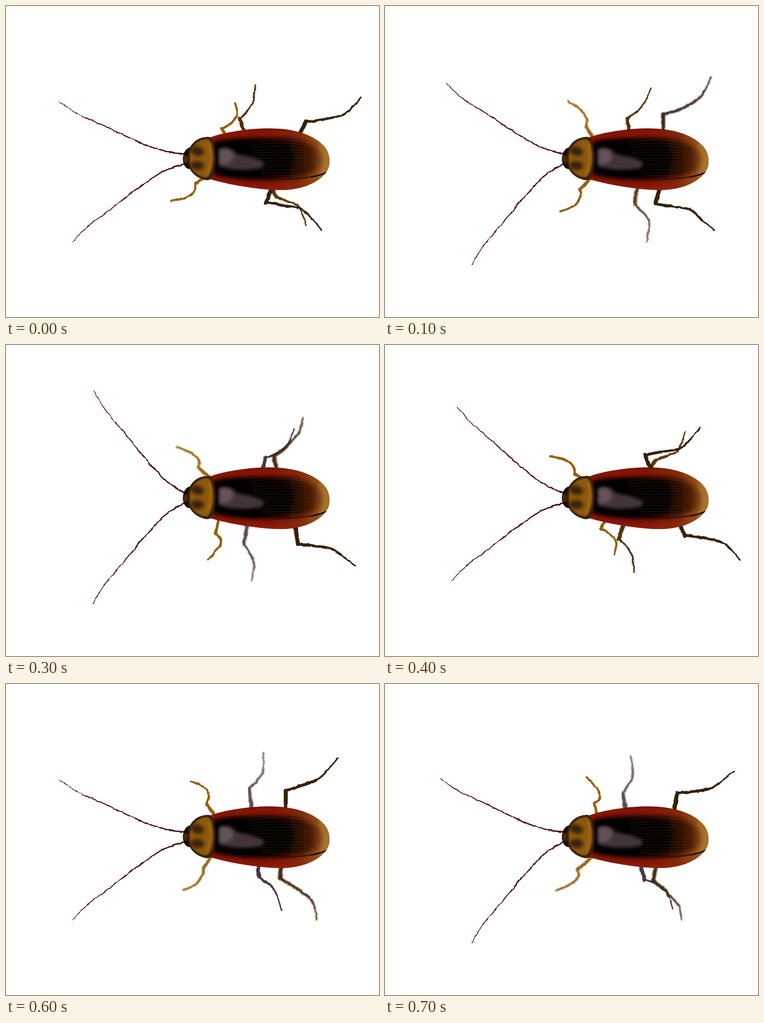
Write an HTML page that moves like this. It is 700x583 px and loops after 800 ms.

```html
<!DOCTYPE html>
<html lang="en">
<head>
<meta charset="utf-8">
<title>Crawling cockroach</title>
<style>
  html, body { margin: 0; width: 100%; height: 100%; overflow: hidden; background: #fff; }
  svg { display: block; width: 100%; height: 100%; }
</style>
</head>
<body>
<svg viewBox="0 0 700 583">
  <defs>
    <linearGradient id="shell" gradientUnits="userSpaceOnUse" x1="385" y1="0" x2="607" y2="0">
      <stop offset="0" stop-color="#8a1507"/>
      <stop offset=".5" stop-color="#861406"/>
      <stop offset=".75" stop-color="#842a0a"/>
      <stop offset=".9" stop-color="#915018"/>
      <stop offset="1" stop-color="#a8752c"/>
    </linearGradient>
    <linearGradient id="core" gradientUnits="userSpaceOnUse" x1="395" y1="0" x2="600" y2="0">
      <stop offset="0" stop-color="#050001"/>
      <stop offset=".5" stop-color="#060101"/>
      <stop offset=".72" stop-color="#1c0803"/>
      <stop offset=".88" stop-color="#4a1b06"/>
      <stop offset="1" stop-color="#7c4412" stop-opacity=".3"/>
    </linearGradient>
    <linearGradient id="edge" x1="0" y1="0" x2="0" y2="1">
      <stop offset="0" stop-color="#4d0903" stop-opacity=".5"/>
      <stop offset=".07" stop-color="#8a1507" stop-opacity="0"/>
      <stop offset=".9" stop-color="#8a1507" stop-opacity="0"/>
      <stop offset="1" stop-color="#a03010" stop-opacity=".5"/>
    </linearGradient>
    <filter id="blur1"><feGaussianBlur stdDeviation="1"/></filter>
    <filter id="blur3" x="-30%" y="-30%" width="160%" height="160%"><feGaussianBlur stdDeviation="3"/></filter>
    <filter id="blur5" x="-30%" y="-30%" width="160%" height="160%"><feGaussianBlur stdDeviation="5"/></filter>
    <filter id="rough" filterUnits="userSpaceOnUse" x="0" y="0" width="700" height="583" color-interpolation-filters="sRGB">
      <feTurbulence type="fractalNoise" baseFrequency=".09" numOctaves="2" seed="4"/>
      <feDisplacementMap in="SourceGraphic" scale="4" xChannelSelector="R" yChannelSelector="G"/>
    </filter>
    <path id="wing" d="M384 246C408 237 455 229 497 229.500C545 230 580 243 598 264C607 275 608 286 607 297C605 313 588 329 562 338C538 346 515 346 490 344C455 341 415 334 384 325Z"/>
    <clipPath id="wingClip"><use href="#wing"/></clipPath>
  </defs>

  <g id="limbs" filter="url(#rough)" fill="none" stroke-linecap="round" stroke-linejoin="round"></g>

  <use href="#wing" fill="url(#shell)"/>
  <g clip-path="url(#wingClip)">
    <use href="#wing" fill="url(#edge)"/>
    <path d="M388 256C420 248 470 247 525 248C565 251 588 266 593 286C594 305 575 317 540 322C490 328 430 326 388 315Z" fill="url(#core)" filter="url(#blur5)"/>
    <path d="M393 258C425 251 480 252 515 256C545 264 548 300 520 314C480 323 430 322 393 311Z" fill="#050001" filter="url(#blur5)"/>
    <path d="M588 258C602 275 604 302 588 321" fill="none" stroke="#b5843a" stroke-width="9" opacity=".5" filter="url(#blur3)"/>
    <g id="veins" fill="none" stroke="#8b4c18" stroke-width=".8" opacity=".38"></g>
    <path d="M400 268C412 263 426 267 432 277C448 282 465 281 472 289C488 289 487 303 472 305C448 309 420 307 400 301Z" fill="#5d4852" opacity=".72" filter="url(#blur3)"/>
    <path d="M400 270C410 266 422 268 426 279C428 290 418 298 400 297Z" fill="#79626c" opacity=".65" filter="url(#blur3)"/>
    <path d="M500 325C545 326 580 321 603 311" fill="none" stroke="#250b03" stroke-width="1.500"/>
    <path d="M572 321Q590 318 601 312" fill="none" stroke="#180702" stroke-width="2"/>
  </g>

  <path d="M346 265C338 266 332 275 332 287C332 297 337 306 346 306Z" fill="#120903"/>
  <ellipse cx="337" cy="287" rx="4.500" ry="8" fill="#4a2b0a" filter="url(#blur1)"/>
  <path d="M341 286C340 267 352 247 376 245.500Q384 244 387 250C396 271 396 304 385 323Q382 328 373 326C352 320 341 307 341 286Z" fill="#392007"/>
  <path d="M345 286C344 268 356 252 374 250C382 249 385 254 387 264C391 283 389 307 380 319C376 323 369 321 362 317C349 310 345 301 345 286Z" fill="#8d5a11" filter="url(#blur1)"/>
  <path d="M381 259Q388 285 377 315" fill="none" stroke="#a56b18" stroke-width="4" opacity=".7" filter="url(#blur1)"/>
  <g fill="#38220a" filter="url(#blur3)">
    <ellipse cx="359" cy="272" rx="13" ry="8.500" transform="rotate(18 359 272)"/>
    <ellipse cx="359" cy="299" rx="13" ry="8.500" transform="rotate(4 359 299)"/>
  </g>
  <path d="M347 286H376" stroke="#99651a" stroke-width="3" opacity=".5" filter="url(#blur1)"/>
</svg>

<script>
const STEP = 100, STEPS = 8;
const GOLD = '#95600f', BROWN = '#54320c', DARK = '#35200a', PLUM = '#4a3846';

// Each pose: three upper legs, three lower legs (front, middle, rear); flip is the mirror sum in y.
const stretch = { flip: 574, colors: [GOLD, BROWN, DARK, GOLD, '#5f3a0e', DARK], soft: '', legs: [
  '411,240 405,230 413,226 425,217 434,204 433,193 430,182',
  '447,234 438,211 448,202 458,190 465,176 466,163 468,148',
  '551,240 563,217 594,213 632,204 650,190 666,171',
  '368,325 356,332 355,342 348,353 333,361 310,365',
  '499,345 508,358 530,367 548,374 557,392 563,411',
  '497,345 488,368 520,374 553,380 574,398 592,420'] };
const gather = { flip: 574, colors: [GOLD, '#5d3a20', DARK, GOLD, BROWN, '#38261a'], soft: '135', legs: [
  '382,246 366,231 368,222 360,204 346,195 329,189',
  '473,231 468,203 482,189 495,174 495,155 491,132',
  '515,231 507,203 540,198 573,192 597,170 618,154',
  '389,329 377,349 379,362 366,380 343,396',
  '457,344 455,363 474,377 487,393 499,420',
  '522,346 522,371 553,380 585,398 600,415 612,441'] };
const reach = { flip: 570, colors: [GOLD, PLUM, '#44290e', GOLD, '#584857', DARK], soft: '024', legs: [
  '385,245 371,226 369,212 354,193 333,184',
  '473,231 475,208 499,190 509,172 517,146',
  '516,230 514,206 540,190 571,168 580,148 583,128',
  '388,329 376,346 381,359 375,374 347,388',
  '460,344 457,374 472,390 483,408 483,441',
  '525,346 525,370 580,389 600,405 622,430'] };
const push = { flip: 578, colors: [GOLD, PLUM, '#44290e', GOLD, '#584857', DARK], soft: '024', legs: [
  '380,246 361,230 363,216 345,201 321,191',
  '482,230 487,211 502,206 520,195 532,180 540,157',
  '507,230 503,208 520,197 536,180 551,162 557,136',
  '398,330 393,354 402,363 401,377 379,403',
  '452,342 446,373 464,402 465,420 461,443',
  '543,342 548,373 607,381 630,395 655,414'] };
const poses = [stretch, gather, reach, push];
const flipped = [0, 1, 0, 0, 1, 0, 1, 1];

// Upper leg, shin and foot widths for front, middle and rear legs.
const widths = [[6, 4.5, 3.8], [7, 4.2, 2.6], [7.5, 5.3, 2.8]];

const upperTips = [[99, 179], [115, 146], [136, 116], [165, 86], [136, 116], [115, 146], [99, 179], [103, 177]];
const lowerTips = [[125, 442], [163, 485], [209, 515], [163, 485], [125, 442], [99, 394], [125, 442], [163, 485]];
// Distance along the chord and bend towards the midline.
const feeler = [[0, 0], [22, 7], [47, 11.5], [85, 12.5], [121, 11.5], [152, 9.5], [185, 8.8], [215, 7.5], [240, 3], [254.5, 0]];

const limbs = document.getElementById('limbs');
const lerp = (a, b, k) => a + (b - a) * k;
const pt = p => p.map(v => v.toFixed(1)).join(' ');
const stroke = (d, w) => `<path d="${d}" stroke-width="${w.toFixed(2)}"/>`;

// Smooth curve through the points, tapering from w0 to w1.
function taper(pts, w0, w1) {
  const last = pts.length - 1;
  let out = '';
  for (let i = 0; i < last; i++) {
    const a = pts[Math.max(i - 1, 0)], b = pts[i], c = pts[i + 1], d = pts[Math.min(i + 2, last)];
    const c1 = b.map((v, k) => v + (c[k] - a[k]) / 6);
    const c2 = c.map((v, k) => v - (d[k] - b[k]) / 6);
    out += stroke(`M${pt(b)}C${pt(c1)} ${pt(c2)} ${pt(c)}`, lerp(w0, w1, i / Math.max(last - 1, 1)));
  }
  return out;
}

function leg(pose, i, mirror) {
  const pts = pose.legs[i].split(' ').map(s => {
    const [x, y] = s.split(',').map(Number);
    return [x, mirror ? pose.flip - y : y];
  });
  const [root, knee] = pts;
  const len = Math.hypot(root[0] - knee[0], root[1] - knee[1]);
  const hip = root.map((v, k) => v + (v - knee[k]) / len * 9);
  const [thigh, shin, foot] = widths[i % 3];
  const blur = pose.soft.includes(i) ? ' filter="url(#blur1)"' : '';
  return `<g stroke="${pose.colors[i]}"${blur}>` +
    stroke(`M${pt(hip)}L${pt(knee)}`, thigh) + taper(pts.slice(1), shin, foot) + '</g>';
}

function antenna(base, tip, side) {
  const dx = tip[0] - base[0], dy = tip[1] - base[1], len = Math.hypot(dx, dy);
  const ux = dx / len, uy = dy / len, k = len / 254.5;
  const pts = feeler.map(([s, b]) => [
    base[0] + ux * s * k + uy * b * side,
    base[1] + uy * s * k - ux * b * side]);
  return `<g stroke="#4a0707">${taper(pts, 2.7, 1.2)}</g>`;
}

function draw(step) {
  const pose = poses[step % 4];
  limbs.innerHTML =
    pose.legs.map((_, i) => leg(pose, i, flipped[step])).join('') +
    antenna([335, 277], upperTips[step], 1) +
    antenna([334, 296], lowerTips[step], -1);
}

let veins = '';
for (let i = 0; i < 13; i++) {
  const k = i / 12;
  veins += `<path d="M${455 + 25 * k} ${lerp(256, 316, k)}Q${540} ${lerp(244, 322, k)} ${603 - 8 * k} ${lerp(266, 310, k)}"/>`;
}
document.getElementById('veins').innerHTML = veins;

let shown = -1;
function tick() {
  const step = Math.floor(performance.now() / STEP) % STEPS;
  if (step !== shown) draw(shown = step);
  requestAnimationFrame(tick);
}
tick();
</script>
</body>
</html>
```
